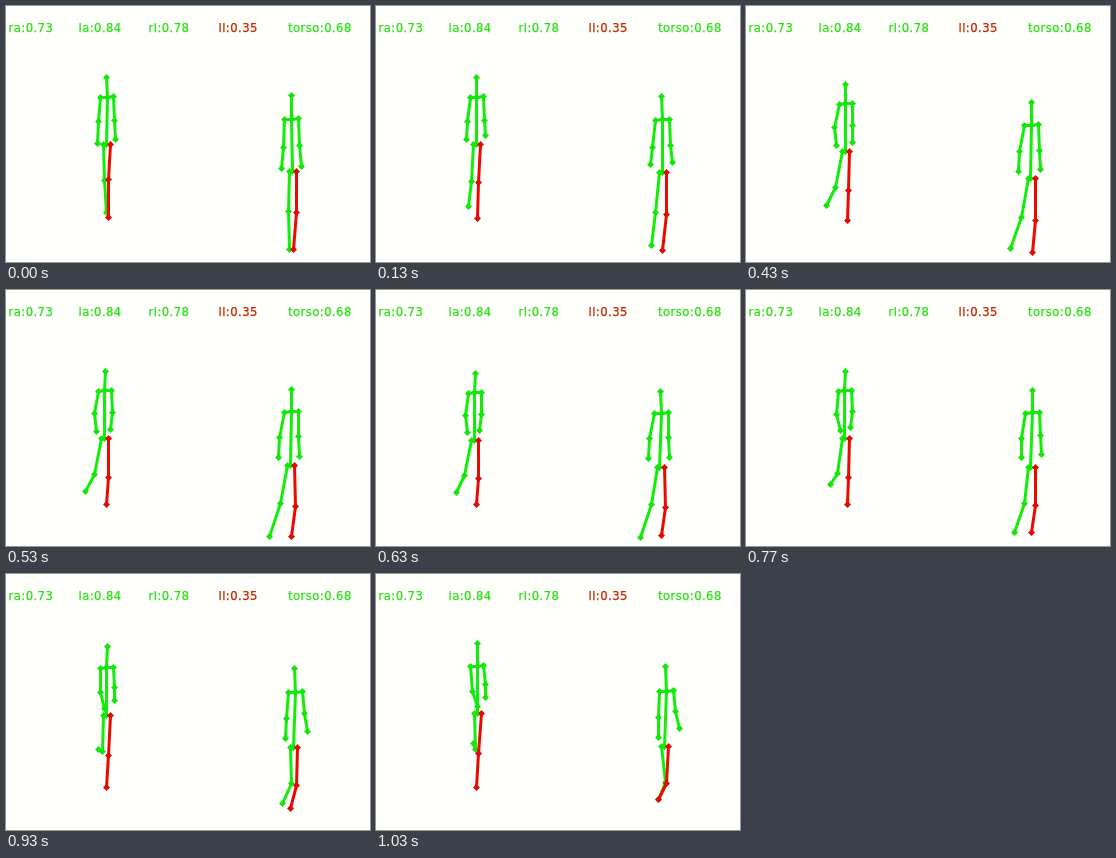
Recreate the animation shown at these times as an HTML page. Size 364 by 256 pixels, loop 1.06 s.

```html
<!DOCTYPE html>
<html lang="en">
<head>
<meta charset="utf-8">
<title>Walking skeletons</title>
<style>
  html, body { margin: 0; width: 100%; height: 100%; overflow: hidden; background: #fffffb; }
  svg { display: block; }
  text {
    font: 11.6px "DejaVu Sans", sans-serif; letter-spacing: .45px;
    fill: #26e010; stroke: #26e010; stroke-width: .25px;
  }
  text.bad { fill: #c82400; stroke: #c82400; }
  .bone { fill: none; stroke-width: 3; stroke-linejoin: round; }
  .good.bone { stroke: #12ee0a; }
  .bad.bone { stroke: #ec0a00; }
  .good.dot { fill: #12e60a; }
  .bad.dot { fill: #e20a04; }
</style>
</head>
<body>
<svg width="364" height="256" viewBox="0 0 364 256">
  <text x="2.5" y="26">ra:0.73</text>
  <text x="72.5" y="26">la:0.84</text>
  <text x="142.5" y="26">rl:0.78</text>
  <text x="212.5" y="26" class="bad">ll:0.35</text>
  <text x="282" y="26">torso:0.68</text>
  <g transform="translate(.5 .5)">
    <path class="good bone"/>
    <path class="good dot"/>
    <path class="bad bone"/>
    <path class="bad dot"/>
  </g>
</svg>
<script>
const LOOP = 1060, STEPS = 32;

// Each joint goes from its first to its last place: [x, y, x, y]
const walkers = [
  {
    width: 13, sink: [-2.5, 11],
    head: [100, 71, 101, 69], shoulder: [94, 91, 94, 92], hip: [97, 138, 98, 139],
    elbowR: [92, 115, 96, 117], wristR: [91, 137, 101, 132],
    elbowL: [108, 114, 109, 110], wristL: [109, 133, 109, 123],
    kneeR: [98, 174, 99, 175], ankleR: [100, 206, 97, 169],
    kneeL: [102, 173, 102, 179], ankleL: [102, 211, 100, 213]
  },
  {
    width: 14, sink: [-3.5, 8],
    head: [285, 89, 289, 92], shoulder: [278, 113, 283, 117], hip: [283, 165, 285, 172],
    elbowR: [277, 141, 282, 143], wristR: [275, 162, 282, 163],
    elbowL: [293, 139, 299, 137], wristL: [295, 160, 303, 154],
    kneeR: [282, 205, 289, 208], ankleR: [283, 243, 282, 225],
    kneeL: [290, 206, 290, 209], ankleL: [287, 243, 282, 225]
  }
];

// How limbs leave the straight path, the same for both walkers
const gait = {
  head:   { bob: [0.5, 2.5] },
  elbowR: { bob: [1, -1], swing: [-4.5, -1] },
  wristR: { bob: [1, -3], swing: [-5, 0], fold: [0, -23] },
  elbowL: { bob: [-1, 1.5] },
  wristL: { bob: [-3.5, 2.5], fold: [2, -21] },
  kneeR:  { bob: [0, -2], swing: [-8.5, 1.5] },
  ankleR: { bob: [2.5, 12], swing: [-19, -5] },
  kneeL:  { bob: [2.5, -3.5], swing: [0, 4.5] },
  ankleL: { swing: [-1.5, 3], planted: true }
};

const waves = {
  bob: u => Math.sin(Math.PI * u ** 1.5) ** 2,          // body sinks, then rises
  swing: u => Math.sin(Math.PI * u),                    // leg goes back and returns
  fold: u => Math.exp(-(((u - 0.25) / 0.09) ** 2))      // forearms flick up
};

function joint(walker, name, u) {
  const move = gait[name] || {}, path = walker[name];
  const go = move.planted ? u ** 6 : u; // a planted foot leaves late
  return [0, 1].map(axis => {
    let place = path[axis] + (path[axis + 2] - path[axis]) * go;
    if (!move.planted) place += walker.sink[axis] * waves.bob(u);
    for (const wave in waves) {
      if (move[wave]) place += move[wave][axis] * waves[wave](u);
    }
    return place;
  });
}

const shift = ([x, y], dx, dy) => [x + dx, y + dy];
const line = points => "M" + points.map(p => p.map(Math.round).join(" ")).join("L");
const diamond = ([x, y]) =>
  `M${Math.round(x) - 3.5} ${Math.round(y)}l3.5-3.5 3.5 3.5-3.5 3.5z`;

function chains(walker, u) {
  const at = name => joint(walker, name, u);
  const shoulderR = at("shoulder"), shoulderL = shift(shoulderR, walker.width, -1);
  const neck = shift(shoulderR, walker.width / 2, -0.5);
  const hipR = at("hip"), hipL = shift(hipR, 7, 0), pelvis = shift(hipR, 2.5, 0);
  return {
    good: [
      [at("head"), neck, pelvis],
      [neck, shoulderR, at("elbowR"), at("wristR")],
      [neck, shoulderL, at("elbowL"), at("wristL")],
      [pelvis, hipR, at("kneeR"), at("ankleR")]
    ],
    bad: [[hipL, at("kneeL"), at("ankleL")]]
  };
}

const paint = (selector, d) => document.querySelector(selector).setAttribute("d", d);

function draw(step) {
  const poses = walkers.map(walker => chains(walker, step / (STEPS - 1)));
  for (const kind of ["good", "bad"]) {
    const list = poses.flatMap(pose => pose[kind]);
    paint(`.${kind}.bone`, list.map(line).join(""));
    paint(`.${kind}.dot`, list.flat().map(diamond).join(""));
  }
}

// Steps start at thirtieths of a second, rounded to 10 ms
const startOf = step => Math.round(step * 10 / 3) * 10;

function stepAt(time) {
  let step = STEPS - 1;
  while (step > 0 && startOf(step) > time) step--;
  return step;
}

const begin = performance.now();
let shown = -1;
function tick() {
  const step = stepAt((performance.now() - begin) % LOOP);
  if (step !== shown) draw(shown = step);
  requestAnimationFrame(tick);
}
tick();
</script>
</body>
</html>
```
